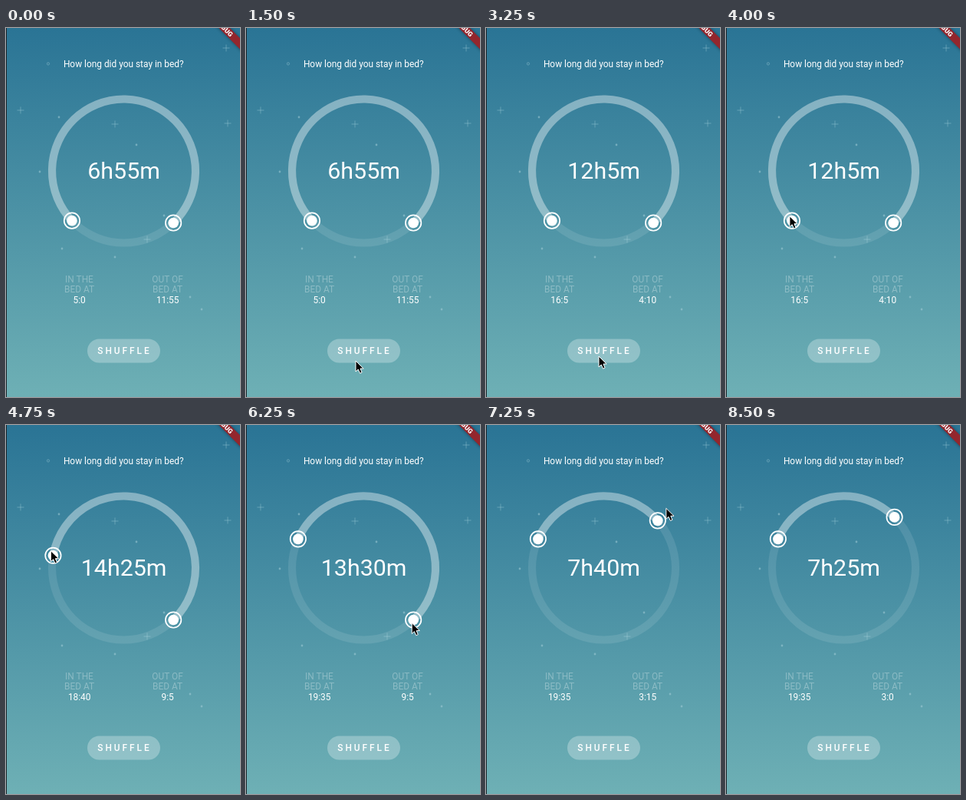
An HTML page that plays this animation: 305 by 480 pixels, repeating every 9500 ms.

```html
<!DOCTYPE html>
<html lang="en">
<head>
<meta charset="utf-8">
<title>Sleep timer</title>
<style>
html, body { margin: 0; width: 100%; height: 100%; overflow: hidden; }
svg { display: block; width: 100vw; height: 100vh; }
text { font: 11.9px Roboto, sans-serif; fill: #fff; text-anchor: middle; }
.dim { fill-opacity: .3; }
.ring { fill: none; stroke: #fff; stroke-width: 10.2; }
#total { font-size: 30.4px; }
#button { font-weight: 500; letter-spacing: 2.95px; text-anchor: start; }
#debug { font-size: 8.6px; font-weight: 900; }
</style>
</head>
<body>
<svg viewBox="0 0 305 480">
  <defs>
    <linearGradient id="sky" x2="0" y2="1">
      <stop stop-color="#2a7495"/>
      <stop offset="1" stop-color="#6eb0b5"/>
    </linearGradient>
    <filter id="blur" x="-20%" y="-150%" width="140%" height="400%"><feGaussianBlur stdDeviation="2"/></filter>
    <g id="knob" fill="#fff">
      <circle r="6.800"/>
      <circle r="10.200" fill="none" stroke="#fff" stroke-width="1.700"/>
    </g>
  </defs>
  <rect width="305" height="480" fill="url(#sky)"/>
  <path id="crosses" stroke="#a9d2dc" stroke-opacity=".4"/>
  <path id="dots" stroke="#a9d2dc" stroke-opacity=".5" stroke-width="2.800" stroke-linecap="round"/>
  <circle cx="55" cy="46.500" r="1.600" fill="none" stroke="#a9d2dc" stroke-opacity=".5" stroke-width=".8"/>
  <rect width="1" height="480" fill="#1d2429"/>

  <text x="153.300" y="50.500">How long did you stay in bed?</text>
  <circle class="ring" cx="153.500" cy="186" r="93.500" stroke-opacity=".1"/>
  <path class="ring" id="arc" stroke-opacity=".32"/>
  <text id="total" x="153.600" y="196"></text>
  <use id="start" href="#knob"/>
  <use id="end" href="#knob"/>

  <text class="dim" x="95.500" y="330.500">IN THE</text>
  <text class="dim" x="95.500" y="344">BED AT</text>
  <text id="from" x="95.700" y="357.500"></text>
  <text class="dim" x="210.500" y="330.500">OUT OF</text>
  <text class="dim" x="210.500" y="344">BED AT</text>
  <text id="to" x="210.700" y="357.500"></text>

  <rect x="106" y="404.500" width="95" height="31" rx="15.500" fill="#fff" fill-opacity=".28"/>
  <text id="button" x="119.300" y="424">SHUFFLE</text>

  <g transform="translate(284.600 0) rotate(45)">
    <rect x="-40" y="-5.100" width="80" height="10.200" opacity=".4" filter="url(#blur)"/>
    <rect x="-40" y="-5.100" width="80" height="10.200" fill="#93262d"/>
    <text id="debug" y="3.100">DEBUG</text>
  </g>
  <path id="cursor" d="M0 0V14L3.200 11L5.600 16.200L8.100 15L6 10H10.200Z" stroke="#fff" stroke-linejoin="round"/>
</svg>
<script>
const LOOP = 9500, STEP = 250, CX = 153.5, CY = 186, R = 93.5;
const $ = id => document.getElementById(id);

const progress = (t, from, to) => Math.min(1, Math.max(0, (t - from) / (to - from)));
const smooth = p => p * p * (3 - 2 * p);

// minutes of the day, snapped to five
const drag = (t, from, to, a, b) => Math.round((a + (b - a) * smooth(progress(t, from, to))) / 5) * 5;
const clock = (m, sep = ':') => Math.floor(m / 60) + sep + m % 60;
const span = (from, to) => (to - from + 1440) % 1440;

function onRing(m) {
  const a = m / 1440 * 2 * Math.PI;
  return [CX + R * Math.sin(a), CY - R * Math.cos(a)];
}

// labels before the first drag
function shuffled(t) {
  if (t < 2500) return [300, 715];
  return t < 3250 ? [440, 815] : [965, 250];
}

// the pointer follows knob p, then knob q
function cursorAt(t, p, q) {
  const near = ([x, y], dx, dy) => [x + dx, y + dy];
  const route = [
    [1000, [60, 254]], [1500, [143, 433]], [3250, [147, 427]],
    [4000, near(p, -3, -6)], [5000, near(p, -3, -6)],
    [6250, near(q, -2, 4)], [7250, near(q, 11, -16)],
    [8000, near(q, 10, -15)], [8250, [178, 68]]
  ];
  const i = route.findIndex(k => k[0] > t);
  if (i < 1) return route[i ? route.length - 1 : 0][1];
  const [t0, a] = route[i - 1], [t1, b] = route[i];
  return a.map((v, j) => v + (b[j] - v) * progress(t, t0, t1));
}

const place = (id, [x, y]) => $(id).setAttribute('transform', `translate(${x} ${y})`);

function draw(now) {
  const t = Math.floor(now % LOOP / STEP) * STEP;
  const a = drag(t, 4250, 4950, 905, 1175), b = drag(t, 6250, 7400, 545, 180);
  const p = onRing(a), q = onRing(b);
  place('start', p);
  place('end', q);
  $('arc').setAttribute('d', `M${p}A${R} ${R} 0 ${span(a, b) > 720 ? 1 : 0} 1 ${q}`);

  const [from, to] = t < 4500 ? shuffled(t) : [a, b];
  $('from').textContent = clock(from);
  $('to').textContent = clock(to);
  $('total').textContent = clock(span(from, to), 'h') + 'm';

  place('cursor', cursorAt(t, p, q));
  $('cursor').style.display = t >= 1000 && t < 8500 ? '' : 'none';
  requestAnimationFrame(draw);
}

const crosses = [[19, 107], [142, 125], [184, 275], [289, 124], [287, 26]];
const dots = [[44, 187], [69, 116], [170, 152], [206, 244], [73, 287], [142, 298], [240, 350], [255, 366]];
$('crosses').setAttribute('d', crosses.map(([x, y]) => `M${x - 4.5} ${y}h9M${x} ${y - 4.5}v9`).join(''));
$('dots').setAttribute('d', dots.map(([x, y]) => `M${x} ${y}h0`).join(''));

requestAnimationFrame(draw);
</script>
</body>
</html>
```
